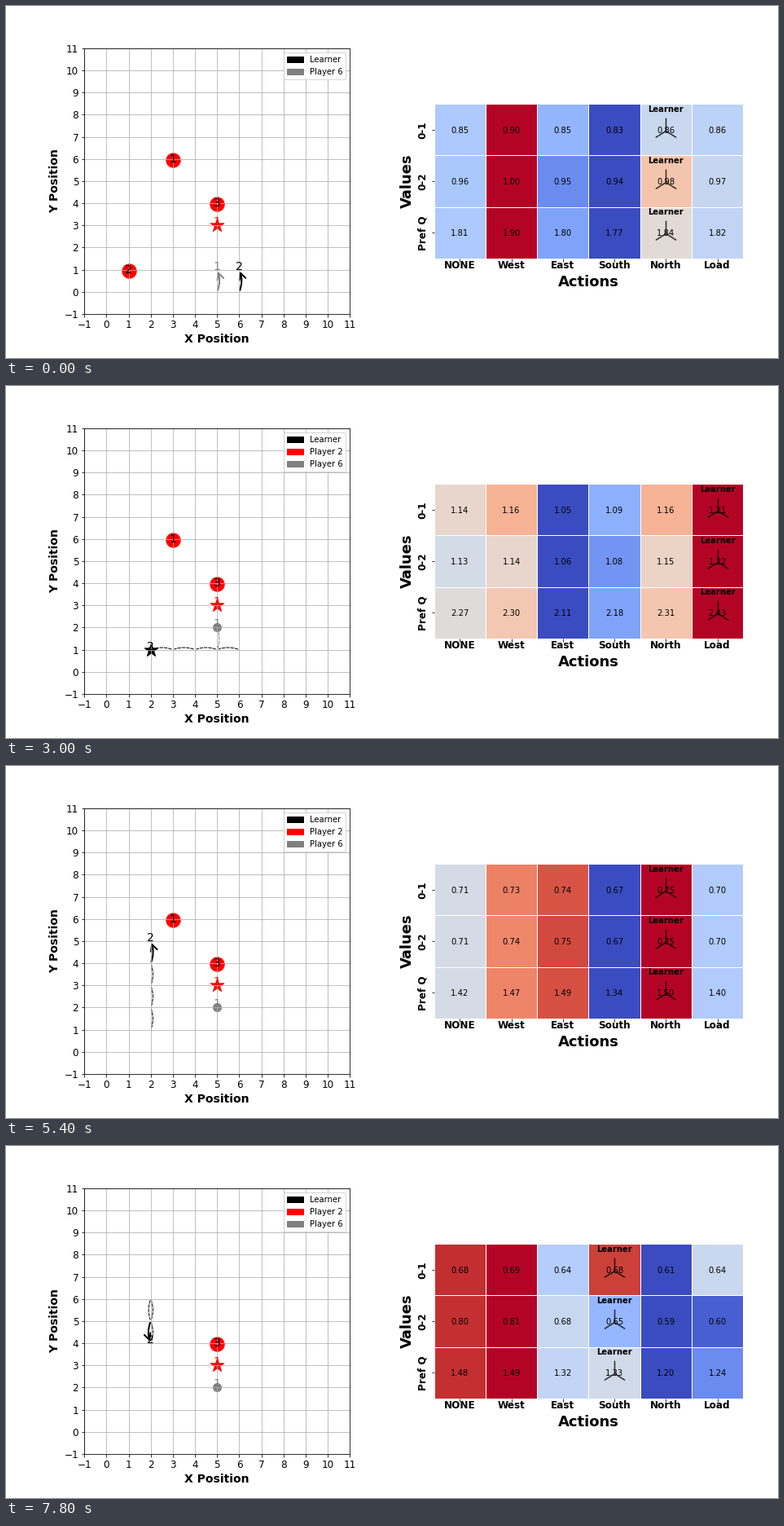
A matplotlib script that plays this animation: 948 px wide and 432 px high, repeating every 8 s.

```python
import numpy as np
import matplotlib.pyplot as plt
from matplotlib.animation import FuncAnimation
from matplotlib.patches import FancyArrowPatch, Patch

W, H, DPI = 948, 432, 72
TICK_MS, TICKS_PER_STEP, TICKS = 200, 3, 40
TRAIL = 4

plt.rcParams["font.family"] = "DejaVu Sans"

ACTIONS = ["NONE", "West", "East", "South", "North", "Load"]
ACTION_OF = {"N": "North", "W": "West", "S": "South", "L": "Load"}
MOVES = {"N": (0, 1), "S": (0, -1), "W": (-1, 0)}

# name, colour, level, start cell, one action per step
AGENTS = [
    ("Learner", "black", 2, (6, 0), "NWWWWLNNNNNLSS"),
    ("Player 2", "red", 1, (5, 3), "L" * 14),
    ("Player 6", "gray", 1, (5, 0), "NN" + "." * 12),
]
# level, cell, step at which it is collected
FOOD = [(1, (3, 6), 11), (2, (1, 1), 5), (3, (5, 4), 99)]

# Action values (two objectives) at key moments; other steps are blended.
KEY_VALUES = np.array([
    [[.8525, .900, .8472, .828, .859, .8561],
     [.9604, 1.004, .948, .938, .979, .9657]],
    [[1.064, 1.0745, 1.018, 1.0683, 1.0649, 1.0542],
     [1.0205, 1.078, .978, 1.032, 1.014, 1.014]],
    [[1.139, 1.1604, 1.053, 1.093, 1.1604, 1.211],
     [1.1313, 1.1443, 1.056, 1.0844, 1.1467, 1.218]],
    [[.6607, .7025, .6957, .6095, .708, .659],
     [.6594, .7013, .7013, .646, .7045, .6561]],
    [[.7076, .7345, .7416, .670, .750, .6984],
     [.7105, .7368, .747, .672, .754, .7011]],
    [[.7993, .7889, .811, .759, .779, .8035],
     [.7797, .7816, .800, .745, .7655, .7851]],
    [[.6835, .687, .6352, .6815, .6055, .6407],
     [.798, .8075, .683, .6505, .591, .601]],
])
BLEND = [0, .4, .7, 1, 1.3, 2, 2.9, 3, 3.5, 4, 4.2, 5, 5.9, 6]


def values_at(step):
    low = int(BLEND[step])
    high = min(low + 1, len(KEY_VALUES) - 1)
    part = BLEND[step] - low
    pair = KEY_VALUES[low] * (1 - part) + KEY_VALUES[high] * part
    return np.vstack([pair, pair.sum(axis=0)])


def path_of(start, actions):
    cells = [start]
    for a in actions:
        dx, dy = MOVES.get(a, (0, 0))
        cells.append((cells[-1][0] + dx, cells[-1][1] + dy))
    return cells


PATHS = [path_of(start, acts) for _, _, _, start, acts in AGENTS]

fig = plt.figure(figsize=(W / DPI, H / DPI), dpi=DPI, facecolor="white")


def axes_px(left, top, width, height):
    return fig.add_axes([left / W, 1 - (top + height) / H, width / W, height / H])


def label(x, y, text, size, rotation=0):
    fig.text(x / W, 1 - y / H, text, fontsize=size, fontweight="bold",
             ha="center", va="center", rotation=rotation)


# Grid world
world = axes_px(96.2, 51.84, 326.16, 326.16)
world.set(xlim=(-1, 11), ylim=(-1, 11), xticks=range(-1, 12), yticks=range(-1, 12))
world.tick_params(labelsize=12)
world.grid(True)
label(259, 409, "X Position", 14)
label(60, 215, "Y Position", 14, 90)

# Value table
CELL = 63.27
table = axes_px(525.6, 120.1, 6 * CELL, 3 * CELL)
table.set(xlim=(0, 6), ylim=(3, 0), xticks=np.arange(6) + .5, yticks=np.arange(3) + .5)
table.tick_params(labelbottom=False, labelleft=False)
table.spines[:].set_visible(False)
for i, name in enumerate(ACTIONS):
    label(525.6 + (i + .5) * CELL, 318, name, 12)
for i, name in enumerate(["0-1", "0-2", "Pref Q"]):
    label(512, 120.1 + (i + .5) * CELL, name, 12, 90)
label(715, 338.5, "Actions", 18)
label(492.5, 215, "Values", 18, 90)

mesh = table.pcolormesh(np.arange(7), np.arange(4), np.zeros((3, 6)), cmap="coolwarm",
                        vmin=0, vmax=1, edgecolors="white", linewidth=1)
ROW_Y = np.arange(3) + .516
numbers = [[table.text(c + .5, y, "", fontsize=10, ha="center", va="center")
            for c in range(6)] for y in ROW_Y]
pick_marks = table.scatter([.5] * 3, ROW_Y, marker="2", s=1000, color="black",
                           alpha=.8, linewidths=1.5, zorder=4)
pick_names = [table.text(.5, y - .41, "Learner", fontsize=10, fontweight="bold",
                         ha="center", va="center") for y in ROW_Y]

live = []


def curve(a, b, color, **style):
    arrow = FancyArrowPatch(a, b, connectionstyle="arc3,rad=0.2", color=color,
                            fill=False, **style)
    live.append(world.add_patch(arrow))


def draw_agent(agent, path, step):
    _, color, level, _, actions = agent
    for k in range(max(0, step - TRAIL), step):
        if path[k] != path[k + 1]:
            curve(path[k], path[k + 1], color, arrowstyle="-", linestyle="--", linewidth=1)
    here, there = path[step], path[step + 1]
    if here != there:
        curve(here, there, color, arrowstyle="->", mutation_scale=20, linewidth=2)
    else:
        loading = actions[step] == "L"
        live.append(world.scatter(*here, marker="*" if loading else "o",
                                  s=300 if loading else 100, color=color))
    live.append(world.text(*there, str(level), fontsize=14, color=color, ha="center"))


def draw_world(step):
    for level, (x, y), gone in FOOD:
        if step < gone:
            live.append(world.scatter(x, y - .04, s=300, color="red"))
            live.append(world.text(x, y, str(level), fontsize=14, ha="center", va="center"))
    for agent, path in zip(AGENTS, PATHS):
        draw_agent(agent, path, step)
    shown = [a for a in AGENTS if step > 0 or a[0] != "Player 2"]
    live.append(world.legend(handles=[Patch(color=a[1], label=a[0]) for a in shown],
                             loc="upper right", fontsize=10))


def draw_table(step):
    vals = values_at(step)
    low = vals.min(axis=1, keepdims=True)
    high = vals.max(axis=1, keepdims=True)
    mesh.set_array((vals - low) / (high - low))
    for texts, row in zip(numbers, vals):
        for text, v in zip(texts, row):
            text.set_text(f"{v:.2f}")
    x = ACTIONS.index(ACTION_OF[AGENTS[0][4][step]]) + .5
    pick_marks.set_offsets([(x, y) for y in ROW_Y])
    for text in pick_names:
        text.set_x(x)


def update(tick):
    step = tick // TICKS_PER_STEP
    while live:
        live.pop().remove()
    draw_world(step)
    draw_table(step)
    return []


anim = FuncAnimation(fig, update, frames=TICKS, interval=TICK_MS,
                     init_func=lambda: update(0), repeat=True, repeat_delay=0, blit=False)
plt.show()
```
